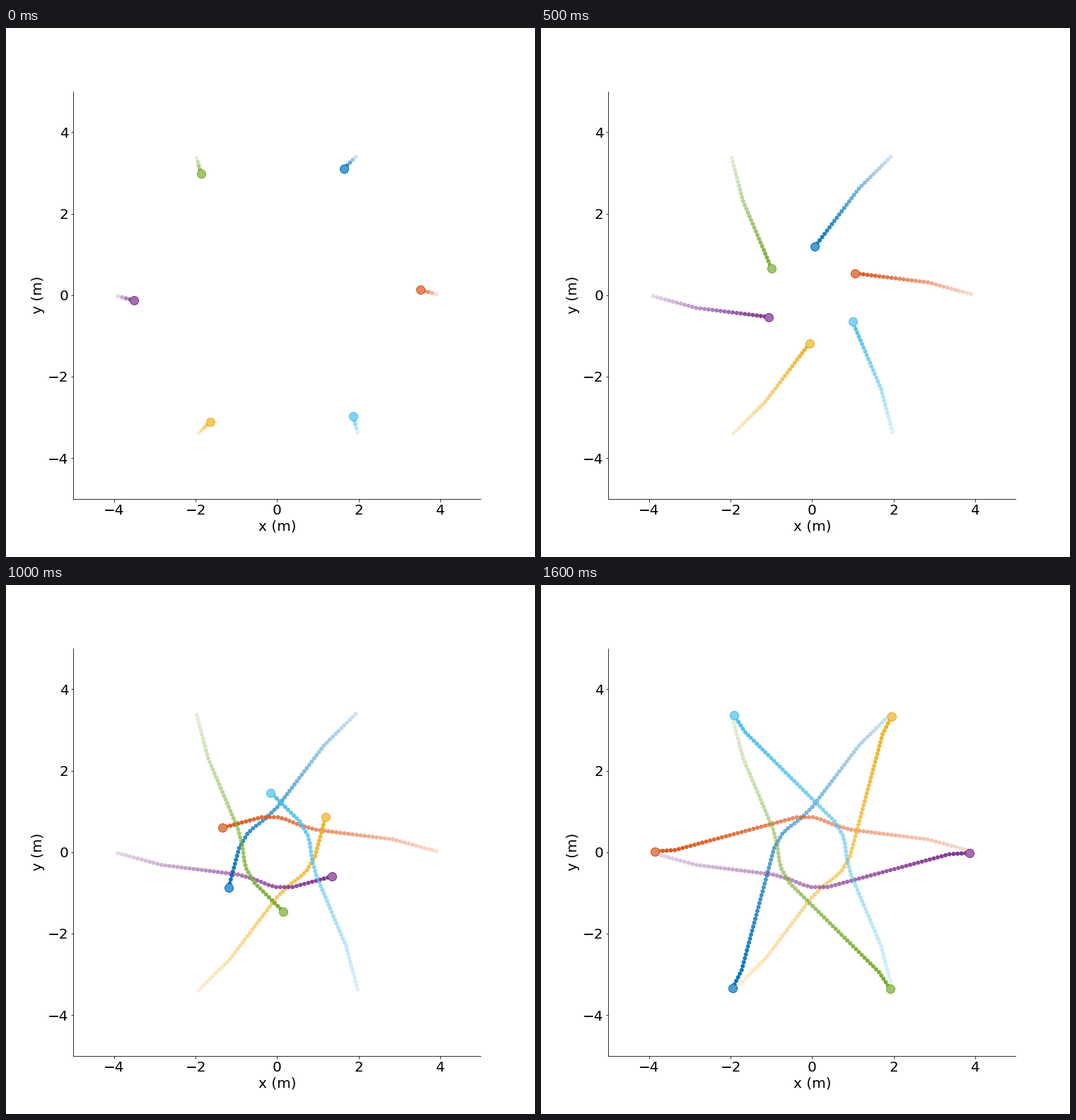
Recreate the animation shown at these times as a matplotlib script. Size 748x748 px, loop 2.6 s.

```python
import numpy as np
import matplotlib.pyplot as plt
from matplotlib.animation import FuncAnimation
from matplotlib.colors import to_rgb

DPI = 72
SIZE = 748
STEPS_PER_FRAME = 5
LAST_STEP = 80
FRAMES = 26

# (step, x, y) bends of one agent's path; the others are rotated copies
BENDS = np.array([
    (0, 3.903, 0.026), (11, 2.842, 0.314), (24, 1.554, 0.474),
    (30, 0.961, 0.550), (34, 0.580, 0.654), (38, 0.210, 0.806),
    (40, 0.020, 0.858), (44, -0.378, 0.858), (75, -3.372, 0.050),
    (80, -3.865, 0.020),
])

# colour and rotation in degrees, in drawing order
AGENTS = [
    ("#0072bd", 60), ("#d95319", 0), ("#edb120", 240),
    ("#7e2f8e", 180), ("#77ac30", 120), ("#4dbeee", 300),
]


def rotated_path(degrees):
    steps = np.arange(LAST_STEP + 1)
    x = np.interp(steps, BENDS[:, 0], BENDS[:, 1])
    y = np.interp(steps, BENDS[:, 0], BENDS[:, 2])
    c, s = np.cos(np.radians(degrees)), np.sin(np.radians(degrees))
    return np.column_stack((c * x - s * y, s * x + c * y))


def lighten(color, strength):
    return tuple(1 - strength * (1 - v) for v in to_rgb(color))


plt.rcParams.update({"font.family": "DejaVu Sans", "font.size": 20})
fig, ax = plt.subplots(figsize=(SIZE / DPI, SIZE / DPI), dpi=DPI)
fig.subplots_adjust(left=0.125, right=0.9, bottom=0.11, top=0.88)
ax.set(xlim=(-5, 5), ylim=(-5, 5), aspect="equal",
       xlabel="x (m)", ylabel="y (m)",
       xticks=range(-4, 5, 2), yticks=range(-4, 5, 2))
ax.spines[["top", "right"]].set_visible(False)

paths, trails, heads = [], [], []
for color, degrees in AGENTS:
    paths.append(rotated_path(degrees))
    trails.append(ax.scatter([], [], s=36, linewidths=0, zorder=2))
    heads += ax.plot([], [], "o", ms=12, mew=1, zorder=3,
                     mfc=lighten(color, 0.7), mec=color)


def update(frame):
    step = min(STEPS_PER_FRAME * frame + STEPS_PER_FRAME - 1, LAST_STEP)
    fade = np.linspace(0.2, 1, step + 1)[:-1]
    for (color, _), path, trail, head in zip(AGENTS, paths, trails, heads):
        trail.set_offsets(path[:step])
        trail.set_facecolors([(*to_rgb(color), a) for a in fade])
        head.set_data(path[step:step + 1].T)
    return trails + heads


anim = FuncAnimation(fig, update, frames=FRAMES, interval=100,
                     init_func=lambda: update(0), repeat=True, repeat_delay=0)
plt.show()
```
